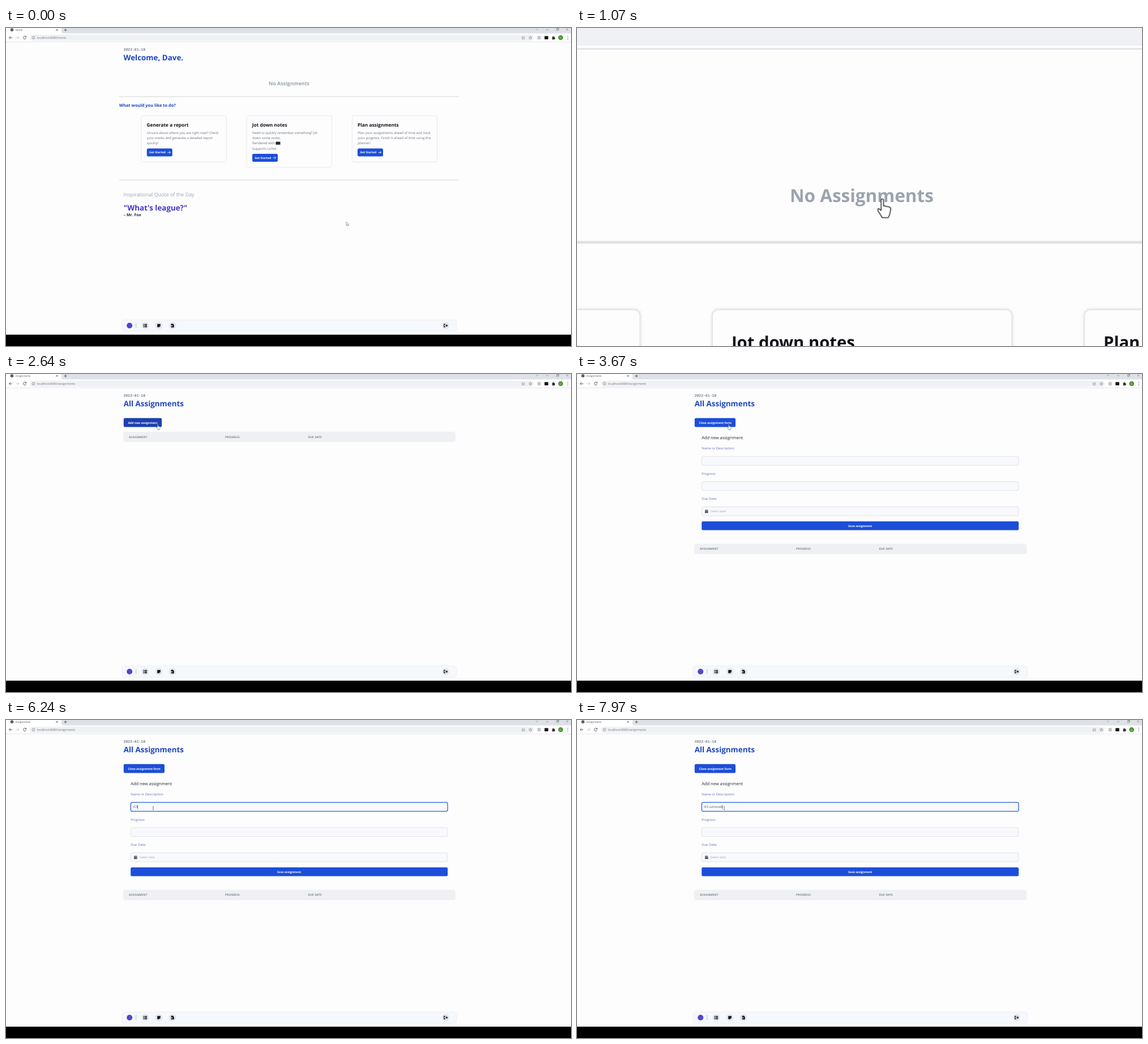
An HTML page for the animation above (8000 ms loop, 998 px wide and 561 px high).

```html
<!DOCTYPE html>
<html lang="en">
<head>
<meta charset="utf-8">
<title>Assignment planner</title>
<style>
html, body { margin: 0; width: 100%; height: 100%; overflow: hidden; background: #fdfdfd; }
svg { display: block; width: 100%; height: 100%; }
text { font-family: "Open Sans", "Noto Sans", sans-serif; text-rendering: geometricPrecision; white-space: pre; }
.line { fill: none; stroke: #3c4043; stroke-width: .8; }
.date { font: 6.4px "Liberation Mono", monospace; fill: #374151; }
.title { font-size: 13.4px; font-weight: 700; fill: #1d46c0; }
.tab { font-size: 4.5px; fill: #4b4f54; }
.url { font-size: 5.2px; fill: #6b6f75; }
.rule { fill: #e2e2e0; }
.card rect { fill: #fdfdfe; stroke: #e5e7eb; stroke-width: .6; filter: drop-shadow(0 .7px .7px #0002); }
.head { font-size: 8.3px; font-weight: 700; fill: #111318; }
.body { font-size: 5.9px; fill: #6b7280; }
.btn { fill: #1d4ed8; }
.cta { font-size: 5.05px; font-weight: 700; fill: #fff; }
.th { font-size: 4.8px; font-weight: 600; letter-spacing: .2px; fill: #5f6672; }
.panel { filter: drop-shadow(0 .9px .9px #0002); }
.label { font-size: 5.9px; fill: #6672c2; }
.input { fill: #f7f9fc; stroke: #d6dae0; stroke-width: .7; }
.small { font-size: 5.3px; }

#camera, #pointer, .at, #thead, #add { animation: 8s infinite; }
#camera { animation-name: zoom; }
#pointer { animation-name: travel; }
.at, #thead, #add { animation-timing-function: step-end; }
.home { animation-name: home; }
.list { animation-name: list; }
.closed { animation-name: closed; }
.open { animation-name: open; }
.focus { animation-name: focus; }
.arrow { animation-name: arrow; }
.hand { animation-name: hand; }
.beam { animation-name: beam; }
#thead { animation-name: drop; }
#add { animation-name: hover; }

@keyframes zoom {
  0% { transform: translate(0, 0) scale(1); animation-timing-function: ease-in-out; }
  7.5%, 12.5% { transform: translate(-1297px, -50.6px) scale(3.6); animation-timing-function: ease-in-out; }
  20%, 100% { transform: translate(0, 0) scale(1); }
}
@keyframes travel {
  0% { transform: translate(601px, 342px); animation-timing-function: cubic-bezier(.4, 0, .8, .8); }
  7.875% { transform: translate(522.8px, 129.3px); animation-timing-function: ease-out; }
  10%, 22% { transform: translate(510.3px, 99.3px); animation-timing-function: ease-in-out; }
  30%, 46.25% { transform: translate(268px, 88.5px); animation-timing-function: ease-in-out; }
  55%, 100% { transform: translate(260px, 155.5px); }
}
@keyframes home { 0% { visibility: visible } 13.75%, 100% { visibility: hidden } }
@keyframes list { 0% { visibility: hidden } 13.75%, 100% { visibility: visible } }
@keyframes closed { 0%, 43.75% { visibility: hidden } 13.75% { visibility: visible } 100% { visibility: hidden } }
@keyframes open { 0% { visibility: hidden } 43.75%, 100% { visibility: visible } }
@keyframes focus { 0% { visibility: hidden } 63.75%, 100% { visibility: visible } }
@keyframes arrow { 0%, 23%, 48% { visibility: visible } 8.8%, 28%, 53% { visibility: hidden } 100% { visibility: hidden } }
@keyframes hand { 0%, 23%, 48% { visibility: hidden } 8.8%, 28% { visibility: visible } 100% { visibility: hidden } }
@keyframes beam { 0% { visibility: hidden } 53%, 100% { visibility: visible } }
@keyframes drop { 0% { transform: none } 43.75%, 100% { transform: translateY(197.8px) } }
@keyframes hover { 0% { fill: #1d4ed8 } 28%, 100% { fill: #1e40af } }
</style>
</head>
<body>
<svg viewBox="0 0 998 561">
<defs>
  <g id="cta">
    <rect class="btn" width="45" height="14" rx="2.5"/>
    <text class="cta" x="4.3" y="8.9">Get Started</text>
    <path d="M36.5 7h5M39.4 4.8 41.6 7l-2.2 2.2" fill="none" stroke="#fff" stroke-width=".8"/>
  </g>
</defs>
<g id="camera">
  <rect width="998" height="561" fill="#fdfdfd"/>

  <!-- browser -->
  <rect width="998" height="24" fill="#fefefe"/>
  <path d="M98 0h900v9.5H100q-2 0-2-2z" fill="#dee1e6"/>
  <rect x="42" y="11.8" width="890" height="11" rx="5.5" fill="#f0f1f4"/>
  <rect y="24" width="998" height=".8" fill="#e0e4ea"/>
  <circle cx="10.5" cy="3.3" r="2.7" fill="#3c4043"/>
  <path d="M8.8 2.6l1.6 1 .5 1.6M11 1.4l1.2 1.4" stroke="#fff" stroke-width=".6" fill="none"/>
  <text class="tab at home" x="16.8" y="5.2">Home</text>
  <text class="tab at list" x="16.8" y="5.2">Assignments</text>
  <text class="url at home" x="55" y="18.9">localhost:8080/home</text>
  <text class="url at list" x="55" y="18.9">localhost:8080/assignments</text>
  <g class="line">
    <path d="M88.5 1.8l3 3m0-3l-3 3M102.5 3.5h5M105 1v5"/>
    <path d="M11.2 17H5.6M8.2 14.4 5.6 17l2.6 2.6"/>
    <path d="M17.5 17h5.6M20.5 14.4l2.6 2.6-2.6 2.6" stroke="#b8bbbf"/>
    <path d="M35.2 15.4a2.6 2.6 0 1 0 .4 2.2M35.6 14v2h-2"/>
    <g stroke="#6b6f75" stroke-width=".6">
      <circle cx="48.5" cy="17" r="2.5"/><path d="M48.5 16.6v1.8M48.5 15.3v.6"/>
      <path d="M913 15.3h-1.5v4h4.5v-1.5M913 18q.2-2 2.8-2m-1-1.3 1.3 1.3-1.3 1.3"/>
      <path d="M926.3 14.3l.8 1.9 2 .1-1.6 1.3.6 2-1.8-1.1-1.8 1.1.6-2-1.6-1.3 2-.1z"/>
      <path d="M936 1.5l1.8 1.8 1.8-1.8M954 3h4M972.5 1.5h2.8v2.8h-2.8zM973.5 1.3V.5h2.9v2.9h-1M989.5.8l3.5 3.5m0-3.5-3.5 3.5"/>
    </g>
  </g>
  <rect x="938.7" y="14" width="6" height="6.3" rx="1" fill="#c5c9c6"/>
  <rect x="951.2" y="14.3" width="6.6" height="5.8" rx=".8" fill="#151515"/>
  <path d="M964.5 15.5h1.3a1 1 0 1 1 2 0h1.3v1.4a1 1 0 1 1 0 2v1.3h-4.6v-1.4a1 1 0 0 0 0-1.9z" fill="#333"/>
  <circle cx="979.7" cy="17" r="4.3" fill="#46962e"/>
  <text x="979.7" y="18.7" text-anchor="middle" font-size="4.6" fill="#d8efd0">D</text>
  <path d="M992.3 14.4v.01M992.3 17v.01M992.3 19.6v.01" stroke="#3c4043" stroke-width="1.2" stroke-linecap="round"/>

  <text class="date" x="207.7" y="40.3">2022-01-18</text>

  <!-- home page -->
  <g class="at home">
    <text class="title" x="207.5" y="56.8">Welcome, Dave.</text>
    <text x="500" y="101" text-anchor="middle" font-size="8.93" font-weight="700" fill="#9ca3af">No Assignments</text>
    <rect class="rule" x="200" y="120.4" width="600" height="1.4"/>
    <text x="199.8" y="139.4" font-size="7.45" font-weight="700" fill="#1d46c0">What would you like to do?</text>
    <g class="card" transform="translate(239 154.8)">
      <rect width="150" height="81.5" rx="3"/>
      <text class="head" x="9.6" y="19.3">Generate a report</text>
      <text class="body"><tspan x="9.8" y="32">Unsure about where you are right now? Check</tspan><tspan x="9.8" y="41.3">your marks and generate a detailed report</tspan><tspan x="9.8" y="50.6">quickly!</tspan></text>
    </g>
    <g class="card" transform="translate(425.2 154.8)">
      <rect width="150" height="90.8" rx="3"/>
      <text class="head" x="9.6" y="19.3">Jot down notes</text>
      <text class="body"><tspan x="9.8" y="32">Need to quickly remember something? Jot</tspan><tspan x="9.8" y="41.3">down some notes.</tspan><tspan x="9.8" y="50.6">Rendered with</tspan><tspan x="9.8" y="59.9">Supports LaTeX.</tspan></text>
      <path d="M51.3 45.8h8v5.2h-8z" fill="#1f2937"/>
    </g>
    <g class="card" transform="translate(611.5 154.8)">
      <rect width="150" height="81.5" rx="3"/>
      <text class="head" x="9.6" y="19.3">Plan assignments</text>
      <text class="body"><tspan x="9.8" y="32">Plan your assignments ahead of time and track</tspan><tspan x="9.8" y="41.3">your progress. Finish it ahead of time using this</tspan><tspan x="9.8" y="50.6">planner!</tspan></text>
    </g>
    <use href="#cta" x="248.8" y="212.5"/>
    <use href="#cta" x="435" y="222"/>
    <use href="#cta" x="621" y="212.5"/>
    <rect class="rule" x="200" y="267.5" width="600" height="1.4"/>
    <text x="207.5" y="296.6" font-size="8.93" fill="#9ca3af">Inspirational Quote of the Day</text>
    <text x="207.7" y="321.7" font-size="13.37" font-weight="700" fill="#4338ca">"What's league?"</text>
    <text x="207.7" y="332.2" font-size="6.97" font-weight="700" fill="#1f2937">– Mr. Fox</text>
  </g>

  <!-- assignments page -->
  <g class="at list">
    <text class="title" x="207.7" y="56.8">All Assignments</text>
    <g id="thead">
      <rect class="panel" x="208" y="103" width="585" height="15.8" rx="2.5" fill="#eff0f3"/>
      <text class="th" y="112.6"><tspan x="217">ASSIGNMENT</tspan><tspan x="387">PROGRESS</tspan><tspan x="533.6">DUE DATE</tspan></text>
    </g>
  </g>
  <g class="at closed">
    <rect id="add" x="207.8" y="77.8" width="67.4" height="15.6" rx="2.5"/>
    <text class="cta" x="215.4" y="87.6">Add new assignment</text>
  </g>
  <g class="at open">
    <rect class="btn" x="207.8" y="77.8" width="72.2" height="15.6" rx="2.5"/>
    <text class="cta" x="215.4" y="87.6">Close assignment form</text>
    <text x="220.2" y="114.5" font-size="7.5" font-weight="500" fill="#1f2937">Add new assignment</text>
    <text class="label"><tspan x="220.2" y="133.2">Name or Description:</tspan><tspan x="220.2" y="177.7">Progress:</tspan><tspan x="220.2" y="222.2">Due Date:</tspan></text>
    <rect class="input" x="220.4" y="145.3" width="559.6" height="15.8" rx="2.5"/>
    <rect class="input" x="220.4" y="189.8" width="559.6" height="15.8" rx="2.5"/>
    <rect class="input" x="220.4" y="234.3" width="559.6" height="15.8" rx="2.5"/>
    <path d="M226 240h5.6v1.2H226zM226 241.8h5.6v3.4H226zM227.2 239h.8v1.2h-.8zM229.6 239h.8v1.2h-.8z" fill="#4b5563"/>
    <text class="small" x="236" y="244.2" fill="#a3a7ad">Select date</text>
    <rect class="btn" x="220.2" y="260" width="560" height="15.6" rx="2.5"/>
    <text class="cta" x="500.2" y="269.7" text-anchor="middle">Save assignment</text>
  </g>
  <g class="at focus">
    <rect x="220.4" y="145.3" width="559.6" height="15.8" rx="2.5" fill="#f7f9fc" stroke="#2f62d9" stroke-width="1.3"/>
    <text id="typed" class="small" x="224.5" y="155.1" fill="#4b5563"></text>
    <rect id="caret" y="150" width=".7" height="6.5" fill="#1f2937"/>
  </g>

  <!-- dock -->
  <rect class="panel" x="205.5" y="515.8" width="589.5" height="18.8" rx="4" fill="#f5f8fc"/>
  <circle cx="218.2" cy="525" r="5" fill="#4f46d0"/>
  <path d="M229.7 520.3v9" stroke="#8fb4c4" stroke-width=".8"/>
  <g fill="#e5e7eb"><circle cx="245.8" cy="525" r="6.5"/><circle cx="270" cy="525" r="6.5"/><circle cx="294" cy="525" r="6.5"/><circle cx="776.6" cy="525" r="6.5"/></g>
  <g fill="#111318">
    <path d="M242.6 522.3h1.4v1.4h-1.4zM244.7 522.3h4.4v1.4h-4.4zM242.6 524.4h1.4v1.4h-1.4zM244.7 524.4h4.4v1.4h-4.4zM242.6 526.5h1.4v1.4h-1.4zM244.7 526.5h4.4v1.4h-4.4z"/>
    <path d="M267.2 522.2h5.7v3.6h-2v2h-3.7zM271.3 527.8v-1.6h1.6z"/>
    <path d="M291.6 521.8h3.2l1.9 1.9v4.6h-5.1z"/>
  </g>
  <g fill="none" stroke-width=".8">
    <path d="M291 525.5h3m-1.1-1.1 1.1 1.1-1.1 1.1" stroke="#fff"/>
    <path d="M776 522.6h-2.3v4.8h2.3M775.3 525h4.2m-1.7-1.8 1.8 1.8-1.8 1.8" stroke="#111318" stroke-width="1.1"/>
  </g>
  <rect y="541" width="998" height="20"/>

  <g id="pointer" fill="#fff" stroke="#333" stroke-width=".45" stroke-linejoin="round">
    <path class="at arrow" d="M0 0v6.6l1.5-1.4 1.1 2.2 1-.5-1-2.1h2z"/>
    <path class="at hand" d="M-.6.5q.6-.9 1.2 0v3l3 .7q.7.3.6 1.2l-.5 2.5-.7 1.6H0L-2.2 6q-.3-1 .5-1l1.1.9z"/>
    <path class="at beam" d="M-1.2-2.8Q0-2.8 0-2.1 0-2.8 1.2-2.8M0-2.2v4.4M-1.2 2.8Q0 2.8 0 2.1 0 2.8 1.2 2.8" fill="none" stroke-width=".6"/>
  </g>
</g>
</svg>
<script>
const typed = document.getElementById('typed');
const caret = document.getElementById('caret');
const message = 'ICS culminati';
const focusAt = 5100, typeAt = 5700, keyDelay = 173;
let start;

function tick(now) {
  start ??= now;
  const t = (now - start) % 8000;
  const count = Math.max(0, Math.floor((t - typeAt) / keyDelay));
  typed.textContent = message.slice(0, count);
  caret.setAttribute('x', 224.5 + (count ? typed.getComputedTextLength() : 0));
  const lit = count > 0 || (t >= focusAt && (t - focusAt) % 1000 < 500);
  caret.setAttribute('opacity', lit ? 1 : 0);
  requestAnimationFrame(tick);
}
requestAnimationFrame(tick);
</script>
</body>
</html>
```
